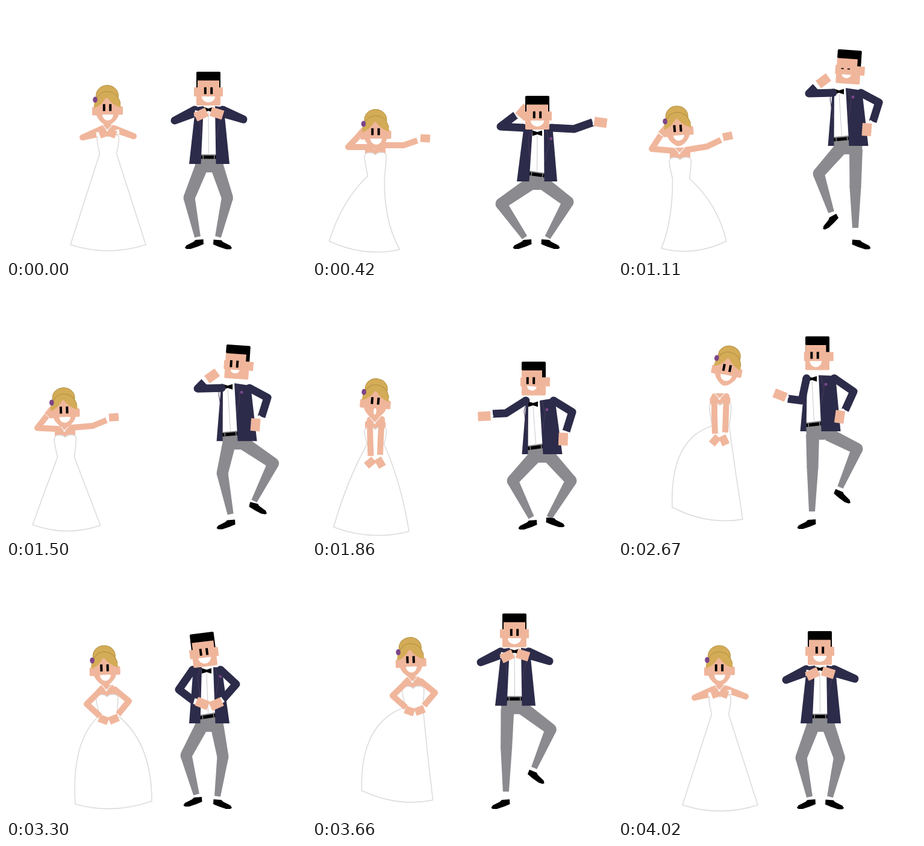
Recreate the animation shown at these times as an HTML page with a canvas. Size 498 by 418 pixels, loop 4.05 s.

```html
<!DOCTYPE html>
<html lang="en">
<head>
<meta charset="utf-8">
<title>Dancing couple</title>
<style>
  html, body { margin: 0; width: 100%; height: 100%; overflow: hidden; background: #fff; }
  canvas { display: block; }
</style>
</head>
<body>
<canvas id="stage" width="498" height="418"></canvas>
<script>
const ctx = document.getElementById('stage').getContext('2d');
const LOOP = 4050, STEP = 30;
const SKIN = '#f0b69c', COAT = '#2c2b49', SEAM = '#4a3a5c', GREY = '#8a8a8f',
      BLOND = '#d4ac57', BLOND_DARK = '#b18f42', PLUM = '#7c4589', LACE = '#dcdcdc';

// Groom, upper body. head: x y angle turn; hem: x y shirtX beltAngle;
// arms: elbow, wrist, hand, hand angle; mouth: width height slant
const suit = {
  fists: { head: [336, 137, 0, 0], bow: [336, 172], hem: [337.5, 262, 336, 0], sh: [336.5, 172],
    L: [280, 190, 313, 178, 324, 180, -25], R: [394, 188, 359, 178, 350, 178, 17], mouth: [22, 10, 0] },
  point: { head: [374, 177, 0, 0], bow: [374, 211], hem: [373.5, 291, 373, 8], sh: [374, 202],
    L: [313, 200, 338, 181, 350, 175, -50], R: [435, 204, 466, 193, 479, 193, 8], mouth: [22, 10, 0] },
  chin: { head: [383, 101, 4, 1], bow: [367, 142], hem: [382, 232, 371, -5], sh: [380, 144],
    L: [317, 145, 328, 134, 341, 124, -36], R: [433, 160, 423, 192, 413, 205, -86], mouth: [15, 6, 0] },
  reach: { head: [368, 153.5, 0, 1], bow: [367, 196], hem: [382, 279, 371, -8], sh: [378, 190],
    L: [322, 211, 300, 212, 286, 216, -3], R: [432, 209, 422, 241, 417, 254, -88], mouth: [16, 7, 6] },
  offer: { head: [331, 111.5, 0, .9], bow: [322, 154], hem: [336, 241, 325, -7], sh: [336, 153],
    L: [305, 190, 282, 187, 269, 181, 22], R: [391, 175, 377, 206, 368, 217, -82], mouth: [20, 10, 0] },
  hips: { head: [328, 139, -7, 0], bow: [333, 174], hem: [337.5, 261, 335, -9], sh: [333, 172],
    L: [287, 205, 312, 224, 326, 228, 22], R: [382, 196, 360, 221, 349, 229, -24], mouth: [21, 10, 0] }
};

// Groom, legs: knee, ankle, shoe, shoe angle
const legs = {
  stand: { l: [304, 318, 318, 383, 312.5, 395, 0], r: [367.5, 318, 352, 383, 359.5, 395.5, 0] },
  squat: { l: [314, 328, 353, 384, 349, 395, 0], r: [425, 325, 391, 384, 396, 395, 0] },
  leftUp: { l: [333, 278, 354, 342, 352, 358, -25], r: [394, 300, 394, 368, 404, 395.5, 0] },
  knees: { l: [333, 323, 364, 384, 358, 396, 0], r: [430, 323, 394, 384, 404, 392, 0] },
  rightUp: { l: [323, 300, 322, 374, 313, 395, 0], r: [397, 270, 369, 334, 373, 349, 18] },
  sway: { l: [299, 314, 316, 379, 310, 391, 0], r: [360, 316, 351, 382, 359.5, 395, 0] }
};

// Bride. lc/lh and rc/rh: side curve control and hem corner of the skirt
const gown = {
  fists: { head: [168, 168.5, 0], bust: [169, 213], waist: [169.5, 245],
    lc: [134, 312], lh: [107, 396], rc: [205, 312], rh: [232, 396], sh: [158, 204, 180, 203],
    L: [127, 218, 150, 213, 163, 211, -20], R: [212, 216, 188, 208, 175, 211, 20], mouth: [18, 10, 0] },
  point: { head: [105.5, 208.5, 0], bust: [105, 243], waist: [106.5, 282],
    lc: [50, 322], lh: [28.5, 390], rc: [118, 354], rh: [145.5, 404], sh: [92, 234, 118, 231],
    L: [60, 234, 77, 216, 83, 211, -50], R: [152, 231, 175, 223, 188, 219.5, 4], mouth: [19, 10, 0] },
  lean: { head: [99, 203, -4], bust: [103, 251], waist: [104.5, 286],
    lc: [91, 356], lh: [72, 402], rc: [165, 328], rh: [180, 390], sh: [90, 240, 112, 239],
    L: [56, 237, 71, 214, 77, 207, -50], R: [148, 233, 171, 222, 182, 216, -12], mouth: [18, 9, 0] },
  shy: { head: [105, 190.5, 5], bust: [105, 234], waist: [105.5, 262],
    lc: [57, 325], lh: [36, 400], rc: [148, 326], rh: [161, 407], sh: [96, 222, 116, 221],
    L: [96.5, 252, 97.5, 282, 96.5, 293, -40], R: [114, 252, 113, 280, 113, 293, 60], mouth: [4.5, 6, .8] },
  jump: { head: [181, 136, 11], bust: [169.5, 194], waist: [170.5, 232],
    lc: [86, 254], lh: [90, 367], rc: [195, 310], rh: [207, 387], sh: [160, 183, 180, 183],
    L: [160, 215, 161, 245, 161, 256, -50], R: [179, 213, 178, 243, 176, 256, 65], mouth: [19, 10, 0] },
  hips: { head: [163.5, 169, -2], bust: [167.5, 213], waist: [170, 247],
    lc: [108, 289], lh: [115, 395], rc: [242, 292], rh: [242, 390], sh: [158, 205, 181, 205],
    L: [134, 229, 156, 249, 162, 255, 20], R: [204, 224, 186, 246, 179, 254, -22], mouth: [18, 10, 0] }
};
const { head, bust, waist, sh, L, R, mouth } = gown.hips;
gown.swing = { ...gown.jump, lc: [78, 273], lh: [82, 386], rc: [191, 325], rh: [200, 402],
  head, bust, waist, sh, L, R, mouth };

// time, upper pose, leg pose, body shift x y, leg shift x
const groomKeys = [
  [0, 'fists', 'stand', 0, 0, 0], [90, 'fists', 'stand', 0, -8, 0],
  [420, 'point', 'squat', 0, 0, 0], [600, 'point', 'rightUp', 6, -66, 52],
  [860, 'point', 'squat', 2, -2, 0], [1110, 'chin', 'leftUp', 0, 0, 0],
  [1365, 'chin', 'knees', 0, 48, 0], [1620, 'chin', 'rightUp', 2, 6, 58],
  [1860, 'reach', 'knees', 0, 0, 0], [2130, 'reach', 'leftUp', 2, -46, 0],
  [2390, 'offer', 'knees', 10, 40, -38], [2670, 'offer', 'rightUp', 0, 0, 0],
  [2890, 'offer', 'stand', 0, 36, 0], [3120, 'hips', 'leftUp', 0, -31, -46],
  [3300, 'hips', 'sway', 0, 0, 0], [3390, 'hips', 'sway', 0, 5, 0],
  [3640, 'fists', 'rightUp', 0, -31, 0], [3880, 'fists', 'stand', 0, 4, 0],
  [4020, 'fists', 'stand', -1, -1, 0], [LOOP, 'fists', 'stand', 0, 0, 0]
].map(([t, up, leg, x, y, lx]) => ({ t, pose: { ...suit[up], ...legs[leg], off: [x, y], legX: [lx] } }));

// time, pose, shift x y
const brideKeys = [
  [0, 'fists', 0, 0], [420, 'point', 0, 0], [560, 'point', -4, 3], [840, 'lean', 2, -3],
  [980, 'point', -2, 2], [1110, 'lean', 0, 0], [1380, 'point', -8, 6], [1620, 'lean', -4, -6],
  [1860, 'shy', 0, 0], [2130, 'shy', 6, -14], [2390, 'shy', 30, 2], [2670, 'jump', 0, 0],
  [2890, 'hips', 0, 7], [3120, 'swing', 14, -14], [3300, 'hips', 0, 0], [3390, 'hips', 0, 2],
  [3640, 'swing', 0, -14], [3880, 'fists', 0, 5], [LOOP, 'fists', 0, 0]
].map(([t, name, x, y]) => ({ t, pose: { ...gown[name], off: [x, y] } }));

function poseAt(keys, t) {
  const i = keys.findIndex(k => k.t > t);
  const a = keys[i - 1], b = keys[i], u = (t - a.t) / (b.t - a.t), e = u * u * (3 - 2 * u);
  const out = {};
  for (const k in a.pose) out[k] = a.pose[k].map((v, n) => v + (b.pose[k][n] - v) * e);
  return out;
}

function fillPoly(color, ...p) {
  ctx.fillStyle = color;
  ctx.beginPath();
  for (let i = 0; i < p.length; i += 2) ctx.lineTo(p[i], p[i + 1]);
  ctx.closePath();
  ctx.fill();
}

function line(color, width, ...p) {
  ctx.strokeStyle = color;
  ctx.lineWidth = width;
  ctx.beginPath();
  for (let i = 0; i < p.length; i += 2) ctx.lineTo(p[i], p[i + 1]);
  ctx.stroke();
}

function box(color, x, y, w, h, r = 0) {
  ctx.fillStyle = color;
  ctx.beginPath();
  ctx.roundRect(x, y, w, h, r);
  ctx.fill();
}

function oval(color, x, y, rx, ry) {
  ctx.fillStyle = color;
  ctx.beginPath();
  ctx.ellipse(x, y, rx, ry, 0, 0, Math.PI * 2);
  ctx.fill();
}

function at(x, y, deg, draw) {
  ctx.save();
  ctx.translate(x, y);
  ctx.rotate(deg * Math.PI / 180);
  draw();
  ctx.restore();
}

// Flat-topped smile; round > 0 bulges the top into an open mouth
function smile(x, y, w, h, round, slant = 0) {
  at(x, y, slant, () => {
    ctx.fillStyle = '#fff';
    ctx.beginPath();
    ctx.ellipse(0, 0, w / 2, h, 0, 0, Math.PI);
    ctx.ellipse(0, 0, w / 2, h * round, 0, Math.PI, Math.PI * 2);
    ctx.fill();
  });
}

function eyes(x, y, open) {
  const h = 11.5 * open;
  for (const s of [-5.2, 5.2]) box('#000', x + s - 2, y - h / 2, 4, h);
}

function arm(color, width, sx, sy, [ex, ey, wx, wy, hx, hy, rot], w, h) {
  ctx.lineJoin = 'round';
  oval(color, sx, sy, width / 2, width / 2);
  line(color, width, sx, sy, ex, ey, wx, wy);
  line('#fff', width - 3, wx, wy, hx, hy);
  at(hx, hy, rot, () => box(SKIN, -w / 2, -h / 2, w, h));
}

// Tapered limb segment
function taper(x1, y1, r1, x2, y2, r2) {
  const d = Math.hypot(x2 - x1, y2 - y1), nx = (y1 - y2) / d, ny = (x2 - x1) / d;
  fillPoly(GREY, x1 + nx * r1, y1 + ny * r1, x2 + nx * r2, y2 + ny * r2,
    x2 - nx * r2, y2 - ny * r2, x1 - nx * r1, y1 - ny * r1);
}

function leg(hx, hy, [kx, ky, ax, ay, fx, fy, rot], side) {
  taper(hx, hy, 11, kx, ky, 9.5);
  taper(kx, ky, 9.5, ax, ay, 5);
  oval(GREY, kx, ky, 9.5, 9.5);
  at(fx, fy, rot, () => {
    ctx.scale(side, 1);
    fillPoly('#000', -15, -8, -2, -7, 1, -4, 13, 2, 15.5, 6, 13, 8, 6, 8, -6, 4, -15.5, 0);
  });
}

function groomHead([x, y, rot, turn], [w, h, slant], open) {
  at(x, y, rot, () => {
    box(SKIN, -24 + 2 * turn, -2, 8, 15, 1);
    box(SKIN, 16 + 3 * turn, -2, 8, 15, 1);
    box(SKIN, -20, -20, 40, 48, 2);
    box('#000', -20, -28, 40, 14.5, 2);
    box('#000', -20, -16, 2 * (1 - turn), 14);
    const burn = 2 + 4 * turn;
    box('#000', 20 - burn, -16, burn, 14);
    eyes(-5 * turn, 3.5, open);
    smile(-3 * turn, 13, w, h, 0, slant);
  });
}

function groom(t) {
  const p = poseAt(groomKeys, t), [ox, oy] = p.off;
  const [bx, by] = p.bow, [hx, hy, sx, tilt] = p.hem, [cx, cy] = p.sh;
  const shift = a => a.map((v, i) => i < 6 && i % 2 === 0 ? v + p.legX[0] : v);
  leg(hx + ox - 13, hy + oy + 5, shift(p.l), -1);
  leg(hx + ox + 13, hy + oy + 5, shift(p.r), 1);

  ctx.save();
  ctx.translate(ox, oy);
  fillPoly(GREY, hx - 24, hy - 2, hx + 24, hy - 2, hx + 23, hy + 5, hx + 7, hy + 14, hx - 7, hy + 14, hx - 23, hy + 5);
  fillPoly('#fff', bx - 9, by - 6, bx + 12, by - 6, sx + 14, hy - 2, sx - 14, hy - 2);
  at(sx, hy - 11.5, tilt, () => {
    box(GREY, -14, -4.5, 28, 16);
    box('#000', -13, -2.5, 26, 5.5);
    box(GREY, -9.5, -2.5, 1.5, 5.5);
    box(GREY, 9, -2.5, 1.5, 5.5);
  });
  line('#c9c9cf', 1, bx, by + 4, sx + .5, hy - 17);

  fillPoly(COAT, bx - 8, by - 6, Math.min(cx - 22, bx - 11), cy - 4, hx - 33.5, hy, sx - 12.5, hy);
  fillPoly(COAT, bx + 11, by - 6, cx + 25, cy - 4, hx + 33.5, hy, sx + 12.5, hy);
  line(SEAM, 1, bx - 11, by - 5, bx - 15, by + 12, (bx + sx) / 2 - 12, by + 44);
  line(SEAM, 1, bx + 15, by - 5, bx + 20, by + 16, (bx + sx) / 2 + 13, by + 46);
  oval(PLUM, bx + 23, by + 9, 2.5, 2.5);
  fillPoly('#000', bx - 8, by - 4.5, bx, by - 2, bx + 8, by - 4.5, bx + 8, by + 4.5, bx, by + 2, bx - 8, by + 4.5);

  arm(COAT, 13, cx - 23, cy, p.L, 21, 15.5);
  arm(COAT, 13, cx + 23, cy, p.R, 21, 15.5);
  groomHead(p.head, p.mouth, Math.abs(t - 1110) < 75 ? .15 : 1);
  ctx.restore();
}

function brideHead([x, y, rot], [w, h, round]) {
  at(x, y, rot, () => {
    oval(BLOND, 0, -20, 18.5, 17);
    ctx.strokeStyle = BLOND_DARK;
    ctx.lineWidth = 1;
    ctx.stroke();
    box(SKIN, -25, -1, 9, 14, 2);
    box(SKIN, 17, -2, 9, 14, 2);
    ctx.fillStyle = SKIN;
    ctx.fill(new Path2D('M-17.5-16V14Q-15 20-8 26Q0 33 9 26Q16 20 18.5 14V-16Z'));
    const fringe = new Path2D('M-22 1C-23-15-12-27 1-26.5C15-26 23-14 22.5 0Q8-4-1-18Q-9-3-22 1Z');
    ctx.fillStyle = BLOND;
    ctx.fill(fringe);
    ctx.stroke(new Path2D('M-20-9C-16-22-8-27 1-26.5C12-26 19-19 22-7'));
    oval(PLUM, -20, -13, 3.8, 5);
    eyes(0, 0, 1);
    smile(1, 11.5 + round * 7, w, h, round);
  });
}

function bride(t) {
  const p = poseAt(brideKeys, t);
  const [bx, by] = p.bust, [wx, wy] = p.waist, [lx, ly] = p.lh, [rx, ry] = p.rh;
  ctx.save();
  ctx.translate(...p.off);
  fillPoly(SKIN, bx - 9, by - 16, bx + 9, by - 16, bx + 17, by - 8, bx + 17, by + 8, bx - 17, by + 8, bx - 17, by - 8);

  ctx.beginPath();
  ctx.moveTo(bx - 18, by + 7);
  ctx.quadraticCurveTo(bx - 17, by, bx - 10, by + .5);
  ctx.quadraticCurveTo(bx - 3, by, bx, by + 4);
  ctx.quadraticCurveTo(bx + 4, by - .5, bx + 11, by);
  ctx.quadraticCurveTo(bx + 18, by, bx + 18.5, by + 6);
  ctx.quadraticCurveTo(bx + 18, by + 18, wx + 14, wy);
  ctx.quadraticCurveTo(...p.rc, rx, ry);
  ctx.quadraticCurveTo((lx + rx) / 2, (ly + ry) / 2 + 20, lx, ly);
  ctx.quadraticCurveTo(...p.lc, wx - 14, wy);
  ctx.quadraticCurveTo(bx - 17, by + 18, bx - 18, by + 7);
  ctx.fillStyle = '#fff';
  ctx.fill();
  ctx.strokeStyle = LACE;
  ctx.lineWidth = 1.6;
  ctx.lineJoin = 'round';
  ctx.stroke();

  arm(SKIN, 10, p.sh[0], p.sh[1], p.L, 16, 13);
  arm(SKIN, 10, p.sh[2], p.sh[3], p.R, 16, 13);
  line('#f4f0ee', 1.2, bx - 9, by - 16, bx - 1, by - 7, bx + 8, by - 16);
  oval('#f4f0ee', bx - 1, by - 7, 2, 2);
  brideHead(p.head, p.mouth);
  ctx.restore();
}

const start = performance.now();
function draw(now) {
  const t = Math.floor((Math.max(0, now - start) % LOOP) / STEP) * STEP;
  ctx.fillStyle = '#fff';
  ctx.fillRect(0, 0, 498, 418);
  bride(t);
  groom(t);
  requestAnimationFrame(draw);
}
draw(start);
</script>
</body>
</html>
```
